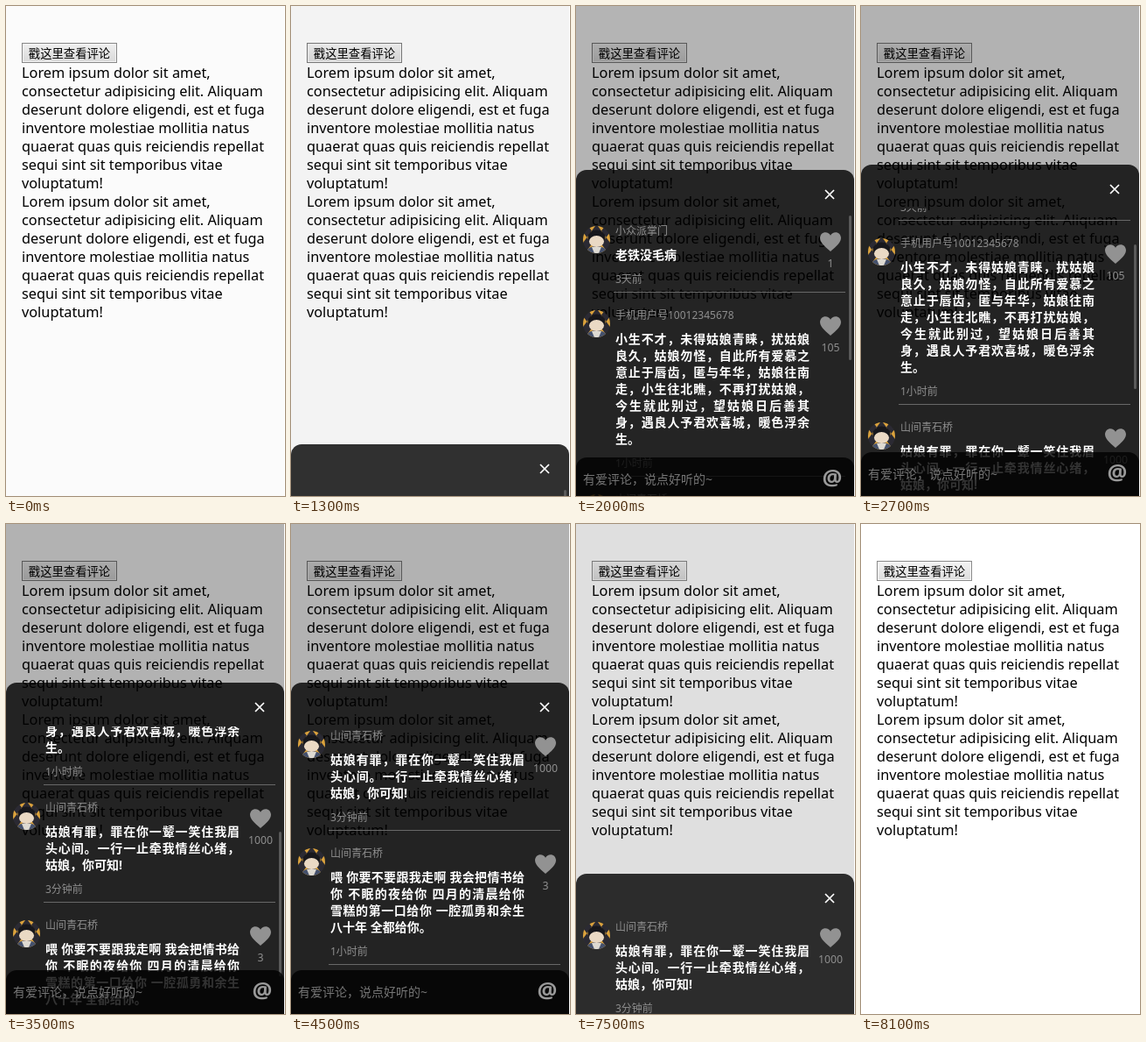
Animation, 319 px wide and 559 px high, one loop 9 s. Source, as an HTML page:

```html
<!DOCTYPE html>
<html lang="zh-CN">
<head>
<meta charset="utf-8">
<title>评论弹层</title>
<style>
  html, body { margin: 0; width: 100%; height: 100%; overflow: hidden; background: #fff; }
  body { font-family: "Noto Sans", "Noto Sans CJK SC", sans-serif; }
  div, span, svg { position: absolute; white-space: pre; }
  #stage { left: 0; top: 0; width: 319px; height: 559px; overflow: hidden; background: #fff; }
  #open {
    left: 18px; top: 42px; width: 107px; height: 21px; border: 1px solid #8a8a8a;
    background: linear-gradient(#f4f4f4, #dcdcdc); box-shadow: inset 0 0 0 1px #f6f6f6;
    font-size: 13.33px; line-height: 22px; text-align: center; color: #000;
  }
  #page { left: 18px; top: 66px; font-size: 16.3px; line-height: 21px; color: #000; }
  #mask { left: 0; top: 0; width: 318px; height: 559px; background: #000; }
  #panel {
    left: 0; top: 181px; width: 318px; height: 378px; overflow: hidden;
    border-radius: 12px 12px 0 0; background: rgba(0, 0, 0, .8);
  }
  #close { left: 284px; top: 22px; }
  #list { left: 0; top: 50px; width: 318px; height: 328px; overflow: hidden; }
  #items { left: 0; top: 0; width: 318px; }
  .item { left: 0; width: 318px; }
  .avatar { left: 8px; top: -15.5px; }
  .small { font-size: 12px; line-height: 16px; font-weight: 500; color: #8e8e8e; }
  .name { left: 45px; top: -17px; }
  .body {
    left: 45px; top: 8px; width: 222px; color: #fff; font-weight: 700;
    font-size: 14px; line-height: 19px; text-spacing-trim: space-all;
  }
  .body p { margin: 0; height: 19px; white-space: normal; text-align: justify; text-align-last: justify; }
  .body p:last-child { text-align-last: left; }
  .time { left: 45px; }
  .rule { left: 43px; width: 265px; height: 1px; background: #686868; }
  .heart { left: 279px; top: -8px; }
  .count { left: 271px; top: 20px; width: 40px; font-size: 12.3px; text-align: center; }
  #thumb { left: 312px; width: 3px; height: 165px; border-radius: 2px; background: #5a5a5a; }
  #bar {
    left: 0; top: 328px; width: 318px; height: 50px;
    border-radius: 12px 12px 0 0; background: rgba(0, 0, 0, .8);
  }
  #hint { left: 8px; top: 15px; font-size: 14px; line-height: 20px; color: #757575; }
  #at { left: 273px; top: 8px; width: 40px; font-size: 25.5px; line-height: 28px; font-weight: 600; text-align: center; color: #999; }
  #caret { left: 8px; top: 18px; width: 1px; height: 15px; background: #ddd; }
</style>
</head>
<body>
<div id="stage">
  <div id="open">戳这里查看评论</div>
  <div id="page"></div>
  <div id="mask"></div>
  <div id="panel">
    <svg id="close" width="12" height="12"><path d="M1 1L11 11M11 1L1 11" stroke="#fff" stroke-width="1.7"/></svg>
    <div id="list"><div id="items"></div><div id="thumb"></div></div>
    <div id="bar"><div id="hint">有爱评论，说点好听的~</div><div id="at">@</div><div id="caret"></div></div>
  </div>
</div>
<svg width="0" height="0">
  <defs>
    <clipPath id="round"><circle cx="15.5" cy="15.5" r="15.5"/></clipPath>
    <pattern id="check" width="11" height="15" patternUnits="userSpaceOnUse" x="-1" y="-2">
      <rect width="11" height="15" fill="#dba23c"/>
      <path d="M5.5 0L11 7.5L5.5 15L0 7.5Z" fill="#2b2a33"/>
    </pattern>
    <g id="avatar" clip-path="url(#round)">
      <rect width="31" height="31" fill="url(#check)"/>
      <path d="M3 31Q5 23 15.5 23T28 31Z" fill="#44506c"/>
      <path d="M10 24H21L18 31H13Z" fill="#dedad2"/>
      <ellipse cx="15.5" cy="13" rx="10" ry="8.5" fill="#17171c"/>
      <ellipse cx="15.5" cy="17.5" rx="8.5" ry="6.5" fill="#ead9c4"/>
    </g>
    <path id="heart" d="M12 22C9 19 0 13 0 6.8C0 3 2.8 .3 6.2 .3C8.7 .3 10.9 1.6 12 3.8C13.1 1.6 15.3 .3 17.8 .3C21.2 .3 24 3 24 6.8C24 13 15 19 12 22Z" fill="#929292"/>
  </defs>
</svg>
<script>
  const LOOP = 9000, STEP = 100;
  const $ = id => document.getElementById(id);

  const lorem = `Lorem ipsum dolor sit amet,
consectetur adipisicing elit. Aliquam
deserunt dolore eligendi, est et fuga
inventore molestiae mollitia natus
quaerat quas quis reiciendis repellat
sequi sint sit temporibus vitae
voluptatum!
`;
  $('page').textContent = lorem + lorem;

  const comments = [
    { name: '小众派掌门', time: '3天前', likes: 1, text: '老铁没毛病' },
    { name: '手机用户号10012345678', time: '1小时前', likes: 105,
      text: '小生不才，未得姑娘青睐，扰姑娘\n良久，姑娘勿怪，自此所有爱慕之\n意止于唇齿，匿与年华，姑娘往南\n走，小生往北瞧，不再打扰姑娘，\n今生就此别过，望姑娘日后善其\n身，遇良人予君欢喜城，暖色浮余\n生。' },
    { name: '山间青石桥', time: '3分钟前', likes: 1000,
      text: '姑娘有罪，罪在你一颦一笑住我眉\n头心间。一行一止牵我情丝心绪，\n姑娘，你可知!' },
    { name: '山间青石桥', time: '1小时前', likes: 3,
      text: '喂 你要不要跟我走啊 我会把情书给\n你 不眠的夜给你 四月的清晨给你\n雪糕的第一口给你 一腔孤勇和余生\n八十年 全都给你。' }
  ];

  let y = 29;
  $('items').innerHTML = comments.map(c => {
    const lines = c.text.split('\n');
    const timeY = 27 + 19 * lines.length;
    const top = y;
    y += timeY + 50;
    return `<div class="item" style="top:${top}px">` +
      `<svg class="avatar" width="31" height="31"><use href="#avatar"/></svg>` +
      `<div class="small name">${c.name}</div>` +
      `<div class="body">${lines.map(l => `<p>${l}</p>`).join('')}</div>` +
      `<div class="small time" style="top:${timeY - 8}px">${c.time}</div>` +
      `<div class="rule" style="top:${timeY + 14}px"></div>` +
      `<svg class="heart" width="24" height="23"><use href="#heart"/></svg>` +
      `<div class="small count">${c.likes}</div></div>`;
  }).join('');

  const clamp = v => Math.min(1, Math.max(0, v));
  const span = (t, from, length) => clamp((t - from) / length);

  // CSS "ease": cubic-bezier(.25, .1, .25, 1)
  function ease(x) {
    if (x <= 0 || x >= 1) return clamp(x);
    const curve = (a, b, u) => 3 * a * u * (1 - u) ** 2 + 3 * b * u * u * (1 - u) + u ** 3;
    let lo = 0, hi = 1;
    for (let i = 0; i < 24; i++) {
      const mid = (lo + hi) / 2;
      if (curve(.25, .25, mid) < x) lo = mid; else hi = mid;
    }
    return curve(.1, 1, lo);
  }

  function scrollAt(t) {
    const fling = 1 - (1 - span(t, 2440, 1060)) ** 1.4;
    const nudge = 1 - (1 - span(t, 3700, 300)) ** 1.6;
    return 233 * fling + 82 * nudge;
  }

  function render(now) {
    const t = Math.floor(now % LOOP / STEP) * STEP;
    const shown = t < 7200 ? ease(span(t, 1165, 1000)) : 1 - ease(span(t, 7200, 900));
    const dim = t < 7200 ? Math.max(.05, shown) : shown;
    const scroll = scrollAt(t);

    $('mask').style.opacity = .3 * dim;
    $('panel').style.visibility = shown > 0 ? 'visible' : 'hidden';
    $('panel').style.transform = `translateY(${Math.round(378 * (1 - shown))}px)`;
    $('items').style.transform = `translateY(${-Math.round(scroll)}px)`;
    $('thumb').style.transform = `translateY(${Math.round(2 + .508 * scroll)}px)`;
    $('thumb').style.opacity = 1 - span(t, 4200, 300);
    $('open').style.borderColor = t >= 1200 && t < 5900 ? '#7c7c7c' : '#8a8a8a';
    $('caret').style.opacity = (t >= 5900 && t < 6300) || (t >= 6800 && t < 7200) ? 1 : 0;
  }

  const start = performance.now();
  function tick() {
    render(performance.now() - start);
    requestAnimationFrame(tick);
  }
  tick();
</script>
</body>
</html>
```
